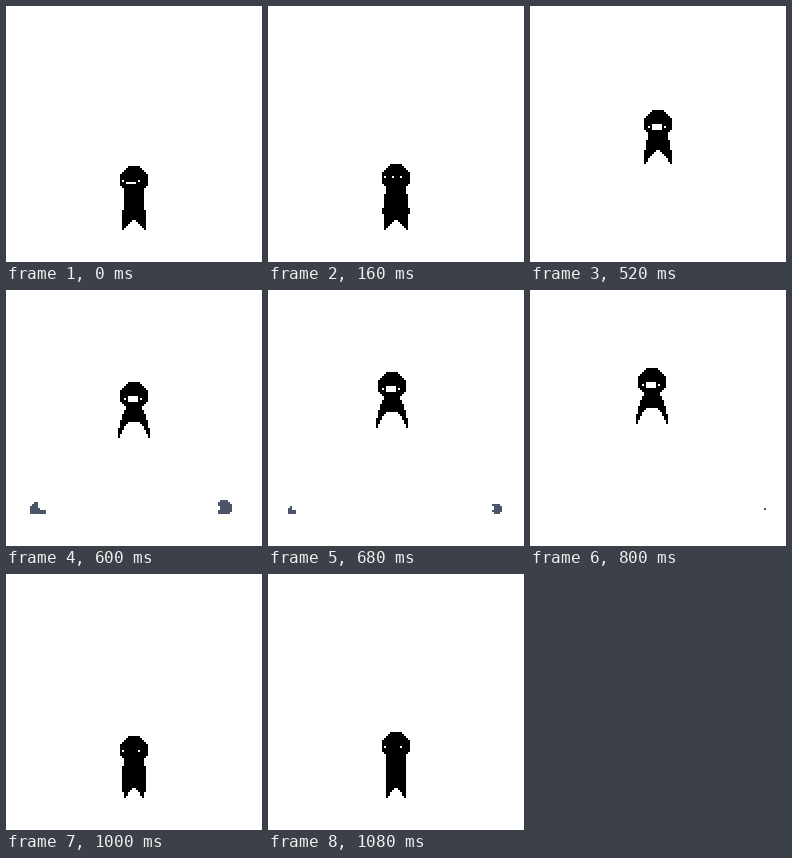
An HTML page with a canvas for the animation above (1120 ms loop, 256x256 px).

```html
<!DOCTYPE html>
<html>
<head>
<meta charset="utf-8">
<style>
html, body { margin: 0; width: 100%; height: 100%; overflow: hidden; background: #fff; }
canvas { display: block; width: 256px; height: 256px; image-rendering: pixelated; }
</style>
</head>
<body>
<canvas id="stage" width="128" height="128"></canvas>
<script>
const ctx = document.getElementById('stage').getContext('2d');
const LOOP = 1120, STEP = 40, GROUND = 112, CENTER = 64;

// Eye row and left eye column, mouth box; all relative to the head's top centre
const FACES = {
  grin: { eyeY: 7, eyeX: -6, mouth: [-4, 8, 5, 1] },
  small: { eyeY: 6, eyeX: -6, mouth: [-2, 6, 1, 1] },
  open: { eyeY: 8, eyeX: -5, mouth: [-3, 7, 5, 3] },
  shut: { eyeY: 7, eyeX: -6 }
};

const clamp = k => Math.min(1, Math.max(0, k));
const progress = (t, from, to) => clamp((t - from) / (to - from));
const lerp = (a, b, k) => a + (b - a) * k;

function fill(color, x, y, w, h) {
  ctx.fillStyle = color;
  ctx.fillRect(x, y, w, h);
}

function row(color, x, y, half) {
  half = Math.round(half);
  fill(color, x - half, y, half * 2, 1);
}

function inhale(t) {
  const k = progress(t, 40, 360);
  return { x: CENTER, top: 80 - 2 * k, bottom: GROUND, neck: 5, foot: 5.7, bulge: 2.7 * k,
    gap: 5, curve: .8, face: t < 160 ? FACES.grin : FACES.small };
}

function soar(t) {
  const spread = progress(t, 520, 600);
  const top = 39 + 1.7e-4 * (t - 800) ** 2;
  const drift = 3 * Math.sin(Math.PI / 2 * Math.max(0, t - 600) / 200);
  return { x: CENTER - drift, top, bottom: Math.round(top) + 27 + spread, neck: 5 - spread,
    foot: 7 + spread, bulge: 0, gap: 7 + spread, curve: .8 - .35 * spread, face: FACES.open };
}

function land(t) {
  const squash = (1 - progress(t, 960, 1080)) ** 2;
  return { x: CENTER, top: 79 + 4 * squash, bottom: GROUND, neck: 5, foot: 5, bulge: 3 * squash,
    gap: 5, curve: .8, face: FACES.shut };
}

function drawBody(x, start, { bottom, neck, foot, bulge, gap, curve }) {
  for (let y = start; y < bottom; y++) {
    const u = (y - start) / (bottom - 1 - start);
    const flare = Math.sin(u * Math.PI / 2), belly = Math.sin(u * Math.PI);
    row('#000', x, y, lerp(neck, foot, flare) + bulge * belly);
    const v = (y + 1 - bottom + gap) / gap;
    if (v > 0) row('#fff', x, y, (foot - 1) * v ** curve);
  }
}

function drawHead(x, top, { eyeY, eyeX, mouth }) {
  for (let i = 0; i < 14; i++) row('#000', x, top + i, Math.min(7, 3 + i, 16 - i));
  for (const dx of [eyeX, eyeX + 8]) fill('#fff', x + dx, top + eyeY, 1, 1);
  if (mouth) {
    const [dx, dy, w, h] = mouth;
    fill('#fff', x + dx, top + dy, w, h);
  }
}

function drawFigure(pose) {
  const x = Math.round(pose.x), top = Math.round(pose.top);
  drawBody(x, top + 12, pose);
  drawHead(x, top, pose.face);
}

function drawStreak() {
  for (let y = 64; y < 106; y++) {
    const d = (y + .5 - 85) / 21;
    row('#000', CENTER, y, 4 * Math.sqrt(1 - d * d));
  }
}

// A disc resting on the ground with a round bite taken out of it
function puff(cx, cy, r, biteX, biteY, biteR) {
  for (let y = 100; y < GROUND; y++)
    for (let x = 0; x < 128; x++) {
      const dx = x + .5 - cx, dy = y + .5 - cy;
      const bitten = Math.hypot(dx - biteX * r, dy - biteY * r) < biteR * r;
      if (Math.hypot(dx, dy) <= r && !bitten) fill('#4a5568', x, y, 1, 1);
    }
}

function drawDust(t) {
  if (t < 560 || t > 800) return;
  const k = (t - 600) / 200;
  const out = k < 0 ? -10 : 8.5 * (1 - (1 - k) ** 2);
  const cy = 109 + .5 * clamp(k);
  puff(109 + out, cy, lerp(4, .6, clamp(k)), -1.1, 0, .5);
  if (k < .8) puff(16 - out * .7, cy + 1, lerp(4, .6, clamp(k / .8)), .8, -.8, .9);
}

function frame(now) {
  let t = Math.floor(now % LOOP / STEP) * STEP;
  if (t < 80) t = 0;
  fill('#fff', 0, 0, 128, 128);
  drawDust(t);
  if (t === 480 || t === 920) drawStreak();
  else drawFigure((t < 480 ? inhale : t < 920 ? soar : land)(t));
  requestAnimationFrame(frame);
}
requestAnimationFrame(frame);
</script>
</body>
</html>
```
